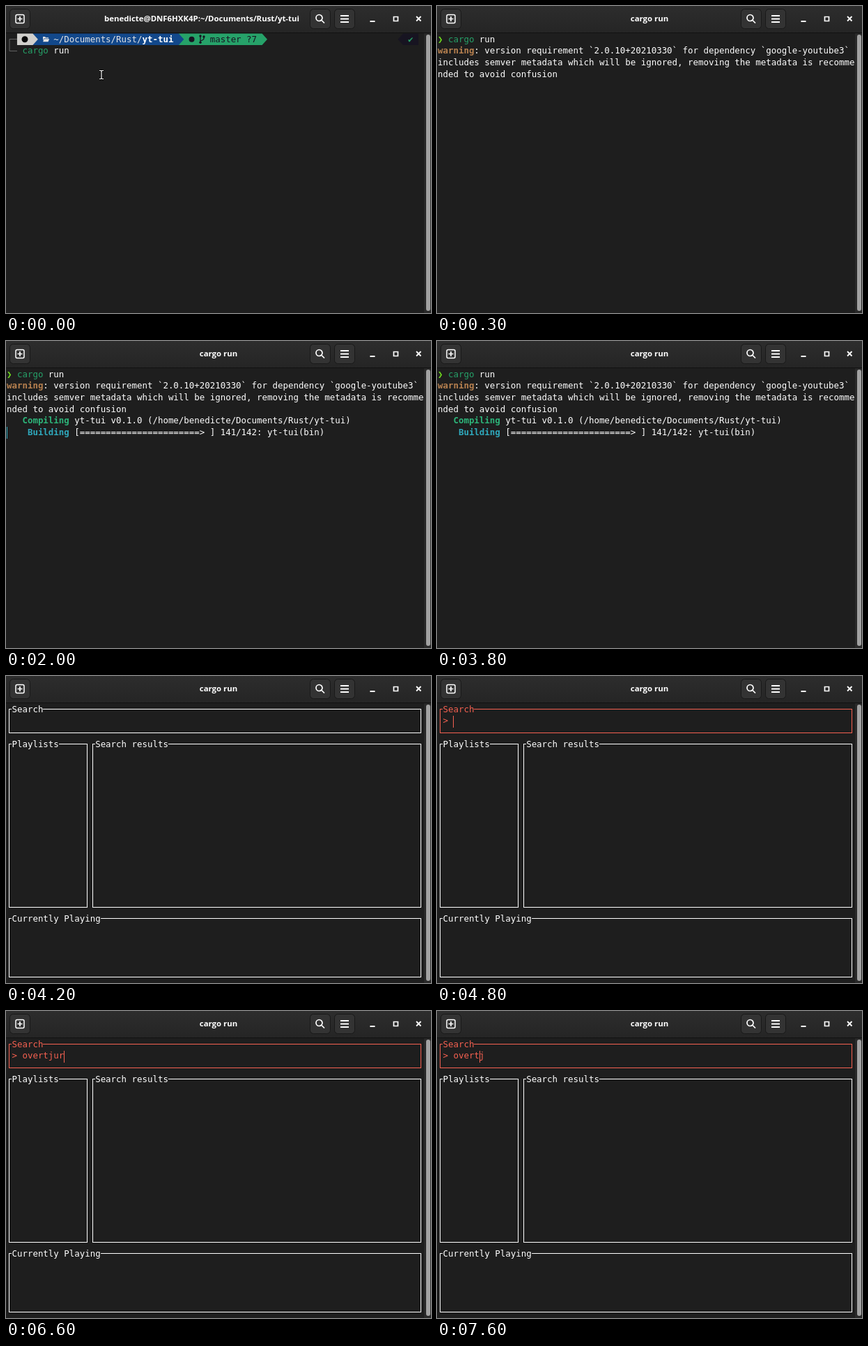
An HTML page with a canvas that plays this animation: 610 px wide and 440 px high, repeating every 8000 ms.

```html
<!DOCTYPE html>
<html lang="en">
<head>
<meta charset="utf-8">
<title>Terminal session</title>
<style>
  html, body { margin: 0; width: 100%; height: 100%; overflow: hidden; background: #1e1e1e; }
  canvas { display: block; }
</style>
</head>
<body>
<canvas id="stage" width="610" height="440"></canvas>
<script>
const g = document.getElementById('stage').getContext('2d');
const LOOP = 8000, CELL = 7.48, ROW = 16.67;
const WHITE = '#fff', GREEN = '#26a269', BLUE = '#12488b', DARK = '#171421', GREY = '#d0cfcc',
      RED = '#f66151', CYAN = '#2fa9bd', LIME = '#2db57a', ORANGE = '#b8814f';

const colX = c => 1 + c * CELL;
const rowY = r => 48 + r * ROW;      // middle of a row

function rect(x, y, w, h, color) {
  g.fillStyle = color;
  g.fillRect(x, y, w, h);
}

function rounded(x, y, w, h, r, fill, stroke) {
  g.beginPath();
  g.roundRect(x, y, w, h, r);
  if (fill) { g.fillStyle = fill; g.fill(); }
  if (stroke) { g.strokeStyle = stroke; g.stroke(); }
}

function path(d, color, width) {
  const p = new Path2D(d);
  if (width) {
    g.strokeStyle = color;
    g.lineWidth = width;
    g.stroke(p);
  } else {
    g.fillStyle = color;
    g.fill(p);
  }
}

function dot(x, y, r, color) {
  g.beginPath();
  g.arc(x, y, r, 0, 7);
  g.fillStyle = color;
  g.fill();
}

// Monospace text on the character grid
function put(col, row, text, color = WHITE, bold = false) {
  g.font = `${bold ? 'bold ' : ''}12.43px "DejaVu Sans Mono", monospace`;
  g.textAlign = 'left';
  g.fillStyle = color;
  const y = Math.round(rowY(row) + 3.8);
  [...text].forEach((ch, i) => ch !== ' ' && g.fillText(ch, colX(col + i), y));
}

function caret(col, row, color = WHITE) {
  rect(Math.round(colX(col)), Math.round(rowY(row) - 8), 1, 17, color);
}

function frame(c0, r0, c1, r1, title, color = WHITE) {
  const x0 = Math.floor(colX(c0 + .5)), x1 = Math.floor(colX(c1 + .5));
  const y0 = Math.floor(rowY(r0) - .3), y1 = Math.floor(rowY(r1));
  const end = Math.round(colX(c0 + 1 + title.length));
  rect(x0, y0, 4, 1, color);
  rect(end, y0, x1 - end + 1, 1, color);
  rect(x0, y1, x1 - x0 + 1, 1, color);
  rect(x0, y0, 1, y1 - y0, color);
  rect(x1, y0, 1, y1 - y0, color);
  put(c0 + 1, r0, title, color);
}

function header(t) {
  const bar = g.createLinearGradient(0, 0, 0, 38);
  bar.addColorStop(0, '#2d2d2d');
  bar.addColorStop(1, '#252525');
  rect(0, 0, 610, 38, bar);
  rect(0, 38, 610, 1, '#111');
  g.lineWidth = 1;
  for (const x of [5.5, 436.5, 471.5]) rounded(x, 4.5, 29, 28, 5, '#333', '#191919');

  g.lineWidth = 1.5;
  rounded(14, 12.5, 12, 12, 2, null, WHITE);
  path('M16.5 18.5h7M20 15v7', WHITE, 1.7);
  path('M454 17a4.5 4.5 0 1 1-9 0a4.5 4.5 0 1 1 9 0M453 20.5l4 4', WHITE, 1.7);
  path('M480 14h12M480 18.5h12M480 23h12', WHITE, 1.8);
  path('M522.5 22h7', WHITE, 2);
  path('M556.5 15.5h6v6h-6z', WHITE, 1.7);
  path('M589 15l6.5 6.5M595.5 15l-6.5 6.5', WHITE, 1.8);

  g.fillStyle = WHITE;
  g.font = 'bold 11.4px "Open Sans", "Noto Sans", sans-serif';
  g.textAlign = 'center';
  if (t < 100) g.fillText('benedicte@DNF6HXK4P:~/Documents/Rust/yt-tui', 281, 22);
  else g.fillText('cargo run', 305, 22);
}

function scrollbar() {
  rect(600, 39, 10, 401, '#292929');
  rounded(603, 41, 6, 396, 3, '#a2a2a2');
}

// Powerline segment: a bar of whole cells ending in a point
function segment(from, to, color) {
  const a = colX(from), b = colX(to);
  path(`M${a} 39.5H${b}L${b + CELL} 47.7L${b} 56H${a}Z`, color);
}

function prompt() {
  path('M16 47.5H5V64.5H16', '#626262', 1);
  segment(33, 49, GREEN);
  segment(5, 33, BLUE);
  segment(2, 5, GREY);
  dot(27, 47.8, 4.5, '#080808');
  path('M53 44h3l1 1.3h4v1.2h-6.5l-1.5 3zM54.6 47.3h7.6l-1.7 4h-7.4z', '#e4e4e4');
  put(9, 0, '~/Documents/Rust/', '#e4e4e4');
  put(26, 0, 'yt-tui', WHITE, true);
  dot(266.5, 47.8, 4, DARK);
  path('M279 44v8M284 45v1.5q0 2-5 3.5', DARK, 1.3);
  for (const [x, y] of [[279, 43], [279, 52.3], [284, 44]]) dot(x, y, 1.7, DARK);
  put(39, 0, 'master ?7', DARK);
  path('M592 39.5H570L562.5 47.7L570 56H592Z', DARK);
  put(77, 0, '✔', GREEN);
  put(3, 1, 'cargo', GREEN);
  put(9, 1, 'run');
  // mouse pointer
  const beam = 'M134 92.5h2l1 1l1-1h2M137 93v11M134 104.5h2l1-1l1 1h2';
  path(beam, '#000', 3);
  path(beam, WHITE, 1.2);
}

function build(t) {
  const blink = Math.floor((t + 400) / 600) % 2 === 0 || t < 200;
  put(0, 0, '❯', '#6fdc1e', true);
  put(2, 0, 'cargo', GREEN);
  put(8, 0, 'run');
  if (t < 200) return caret(0, 1);

  put(0, 1, 'warning', ORANGE, true);
  put(7, 1, ': version requirement `2.0.10+20210330` for dependency `google-youtube3`');
  put(0, 2, 'includes semver metadata which will be ignored, removing the metadata is recomme');
  put(0, 3, 'nded to avoid confusion');
  const compiling = t >= 500;
  if (compiling) {
    put(3, 4, 'Compiling', LIME, true);
    put(13, 4, 'yt-tui v0.1.0 (/home/benedicte/Documents/Rust/yt-tui)');
    put(4, 5, 'Building', CYAN, true);
    put(13, 5, `[${'='.repeat(23)}> ] 141/142: yt-tui(bin)`);
  }
  if (blink) caret(0, compiling ? 5 : 4, compiling ? CYAN : WHITE);
}

// [time, typed text, caret offset from its end]
const TYPING = [
  [4600, ''], [5100, 'o'], [5300, 'ov'], [5500, 'ove'], [5700, 'over'], [5900, 'overt'],
  [6300, 'overtj'], [6400, 'overtju'], [6600, 'overtjur'],
  [6800, 'overtju'], [7000, 'overtj'], [7500, 'overtj', -1]
];

function player(t) {
  const step = TYPING.filter(s => s[0] <= t).pop();
  frame(0, 0, 79, 2, 'Search', step ? RED : WHITE);
  frame(0, 3, 15, 17, 'Playlists');
  frame(16, 3, 79, 17, 'Search results');
  frame(0, 18, 79, 23, 'Currently Playing');
  if (!step) return;
  const [, text, shift = 0] = step;
  put(1, 1, '> ' + text, RED);
  caret(3 + text.length + shift, 1, RED);
}

function draw() {
  const t = performance.now() % LOOP;
  rect(0, 0, 610, 440, '#1e1e1e');
  header(t);
  scrollbar();
  if (t < 100) prompt();
  else if (t < 4200) build(t);
  else player(t);
  requestAnimationFrame(draw);
}
draw();
</script>
</body>
</html>
```
